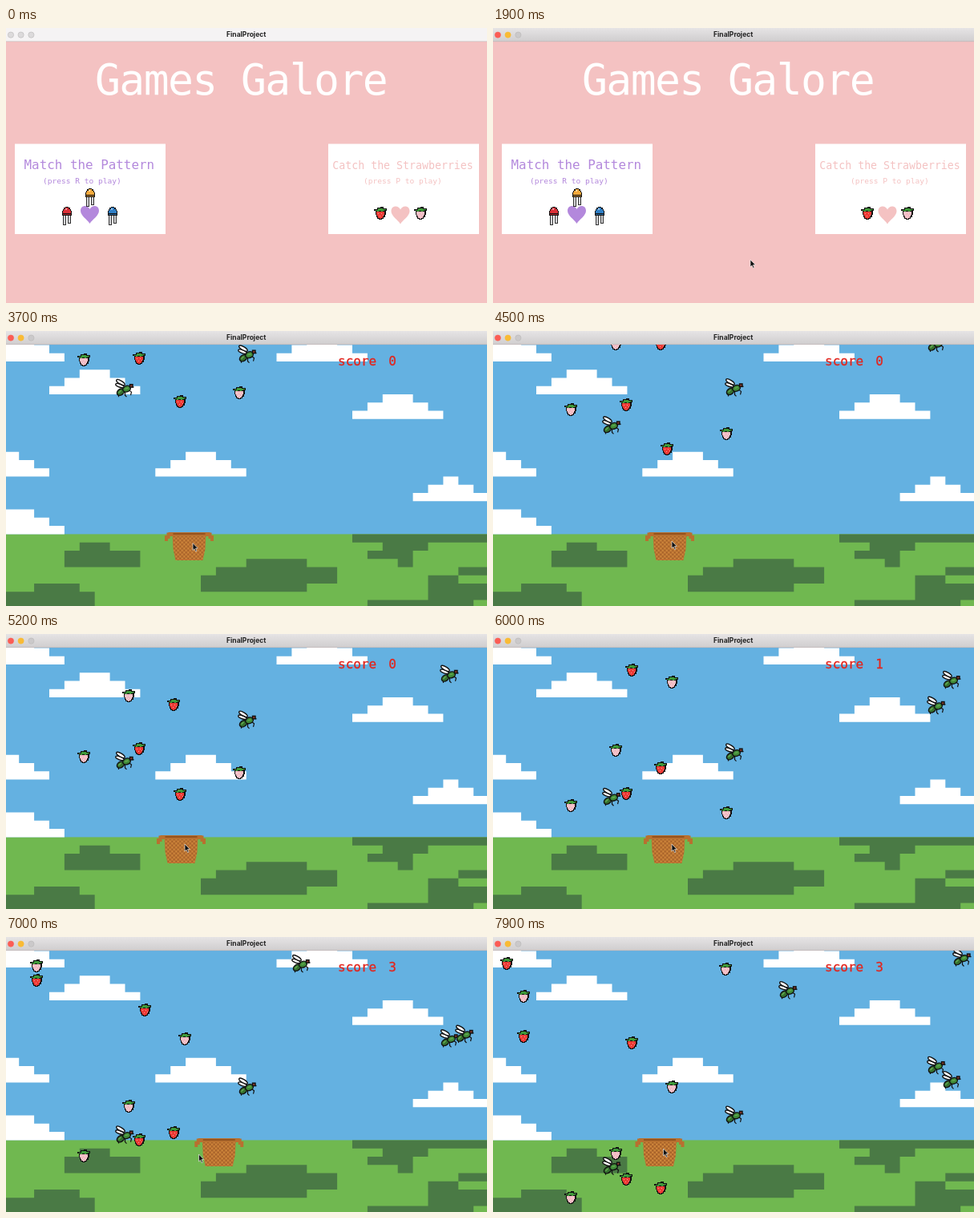
An HTML page for the animation above (8 s loop, 600x343 px).

```html
<!DOCTYPE html>
<html lang="en">
<head>
<meta charset="utf-8">
<title>Games</title>
<style>
  html, body { margin: 0; width: 100%; height: 100%; overflow: hidden; }
  svg { display: block; width: 100vw; height: 100vh; }
  .mono { font-family: "DejaVu Sans Mono", monospace; white-space: pre; }
  .title { font-size: 53px; letter-spacing: -1.57px; }
  .score { font-size: 16px; fill: #e3251d; stroke: #e3251d; stroke-width: .3; }
  .bar { font: 700 8.5px Inter, sans-serif; text-anchor: middle; }
  .pixel { shape-rendering: crispEdges; }
</style>
</head>
<body>
<svg viewBox="0 0 600 343" preserveAspectRatio="none">
  <defs>
    <linearGradient id="barFill" x2="0" y2="1">
      <stop stop-color="#e6e4e5"/><stop offset="1" stop-color="#cfcdce"/>
    </linearGradient>
    <pattern id="weave" width="5" height="5" patternUnits="userSpaceOnUse">
      <rect width="5" height="5" fill="#cc843a"/>
      <path d="M0 0H2.5V5H5V2.5H0Z" fill="#a9632a"/>
    </pattern>
    <path id="cloud" d="M0 0h6v-1h-1v-1h-1v-1h-2v1h-1v1h-1z"/>
    <path id="heart" d="M0 11C-3 6-11.5 1-11.5-5C-11.5-9-9-11-6-11C-3-11-1-9 0-7C1-9 3-11 6-11C9-11 11.5-9 11.5-5C11.5 1 3 6 0 11Z"/>
    <g id="berry" class="pixel">
      <path d="M-8-5H-4V-7H0V-8H4V-6H8V-3H7V2H6V5H4V7H2V8H-2V7H-4V5H-5V2H-6V-3H-8Z" fill="#111"/>
      <path d="M-5-2H5V2H4V4H3V6H1V7H-1V6H-3V4H-4V2H-5Z"/>
      <path d="M-6-4H-3V-6H3V-5H7V-4H5V-3H3V-2H1V-3H-2V-2H-4V-3H-6Z" fill="#3f9a3a"/>
      <path d="M-3 0h1v1h-1zM1 0h1v1h-1zM-1 3h1v1h-1zM3 2h1v1h-1z" fill="#fff" opacity=".5"/>
    </g>
    <g id="red" fill="#ee3a35"><use href="#berry"/></g>
    <g id="pink" fill="#f3bcc4"><use href="#berry"/></g>
    <g id="fly" stroke="#111" stroke-width="1.4">
      <path d="M-3 5L-7 8V11M1 5V9L3 11M5 2L9 5L8 9M8-2L12-1" fill="none" stroke-width="1.2"/>
      <ellipse cx="-4.5" cy="5" rx="5" ry="3.6" transform="rotate(-35 -4.5 5)" fill="#35702f"/>
      <ellipse cx="3" cy="1" rx="5" ry="3.8" transform="rotate(-20 3 1)" fill="#3f8a38"/>
      <path d="M-7 6L-4 3M1 1L5 0" stroke="#68ad53"/>
      <ellipse cx="-5.5" cy="-3" rx="5.5" ry="2" transform="rotate(20 -5.5 -3)" fill="#fff"/>
      <ellipse cx="-4.5" cy="-7" rx="6" ry="2.1" transform="rotate(30 -4.5 -7)" fill="#fff"/>
      <rect x="7" y="-4.5" width="3.5" height="3.5" fill="#8c3a2c"/>
    </g>
    <g id="led" class="pixel">
      <path d="M-5 10H-1V23H-5ZM1 10H5V21H1Z" fill="#333"/>
      <path d="M-4 10H-2V22H-4ZM2 10H4V20H2Z" fill="#d5d5d8"/>
      <path d="M-6 11V5H-5V3H-4V1H-2V0H2V1H4V3H5V5H6V11Z" fill="#111"/>
      <path d="M-5 8V5H-4V3H-2V1H2V3H4V5H5V8Z"/>
      <path d="M-5 9H5V10H-5Z" opacity=".75"/>
      <path d="M-2 2H0V4H-2Z" fill="#fff" opacity=".5"/>
    </g>
  </defs>

  <g id="menu">
    <rect width="600" height="343" fill="#f4c2c2"/>
    <text class="mono title" x="111" y="82.5" fill="#fff">Games Galore</text>
    <path d="M11 144.5H199V257H11ZM402 144.5H590V257H402Z" fill="#fff"/>
    <g class="mono" fill="#b388dc">
      <text x="22.5" y="175.5" font-size="15.9">Match the Pattern</text>
      <text x="46" y="194" font-size="9.55">(press R to play)</text>
      <use href="#heart" x="104.5" y="233"/>
    </g>
    <g class="mono" fill="#f4c2c2">
      <text x="407.3" y="175.5" font-size="13.25">Catch the Strawberries</text>
      <text x="446" y="194" font-size="9.55">(press P to play)</text>
      <use href="#heart" x="492" y="233.5"/>
    </g>
    <use href="#led" x="104.5" y="200" fill="#f6a93b"/>
    <use href="#led" x="76" y="223" fill="#dc3038"/>
    <use href="#led" x="133" y="223" fill="#2f7fc6"/>
    <use href="#red" x="467" y="231"/>
    <use href="#pink" x="517" y="231"/>
  </g>

  <g id="game">
    <rect width="600" height="343" fill="#64b1e1"/>
    <!-- Landscape in units of one coarse block -->
    <g transform="translate(-2.7 17.4) scale(18.9 10.26)">
      <rect y="23" width="32" height="9" fill="#70b850"/>
      <g fill="#fff">
        <use href="#cloud" x="-2" y="2"/><use href="#cloud" x="18" y="2"/>
        <use href="#cloud" x="3" y="6"/><use href="#cloud" x="23" y="9"/>
        <use href="#cloud" x="-3" y="16"/><use href="#cloud" x="10" y="16"/>
        <use href="#cloud" x="-2" y="23"/>
        <path d="M27 19h5v-1h-1v-1h-1v-1h-1v1h-1v1h-1z"/>
      </g>
      <g fill="#4a7a45">
        <path d="M5 24h2v1h2v2h-5v-2h1z"/>
        <path d="M16 26h4v1h2v2h-2v1h-7v-2h1v-1h2z"/>
        <path d="M2 29h3v1h1v2h-6v-2h2z"/>
        <path d="M23 23h9v1h-4v1h-1v2h-1v-1h-2v-1h1v-1h-2z"/>
        <path d="M30 27h2v1h-2v1h2v2h-1v1h-7v-1h4v-3h2z"/>
      </g>
    </g>
    <text class="mono score" x="414" y="43">score</text>
    <text class="mono score" id="score" x="477.3" y="43"></text>
    <g id="basket">
      <path d="M-20 253.5H-26V257H-28.5V262M20 253.5H26V257H28.5V262" fill="none" stroke="#b8702f" stroke-width="4"/>
      <path d="M-21 253H21L20 272L17 286H-17L-20 272Z" fill="url(#weave)"/>
      <path d="M-26 251H26V256H-26Z" fill="#b8702f"/>
      <path d="M-20 252H20V254H-20Z" fill="#94531f"/>
    </g>
    <g id="items"></g>
  </g>

  <rect id="bar" width="600" height="17"/>
  <path d="M0 16.7H600" stroke="#b9a9a9" stroke-opacity=".5"/>
  <g id="lights" stroke-width=".6">
    <circle cx="6" cy="8.6" r="3.6"/><circle cx="18.6" cy="8.6" r="3.6"/><circle cx="31.4" cy="8.6" r="3.6"/>
  </g>
  <text class="bar" x="299.7" y="11.4" fill="#222">FinalProject</text>
  <path id="cursor" d="M0 0V9L2 7.2L3.6 10.6L5 10L3.5 6.6H6.4Z" fill="#111" stroke="#fff" stroke-width=".6"/>
</svg>
<script>
const LOOP = 8000, STEP = 100;
const ENTER = 500, FOCUS = 1500, START = 2480;
const WAVE_GAP = 1000, SPAWN_Y = 14, RIM_Y = 248, REACH = 30, LAG = 100;
const POINTS = { pink: 2, red: 1 };
const $ = id => document.getElementById(id);

// Piecewise linear: each key is [time, ...values]
function track(keys, t, value = 1) {
  const i = keys.findIndex(key => key[0] > t);
  if (i < 1) return keys.at(i)[value];
  const a = keys[i - 1], b = keys[i];
  return a[value] + (b[value] - a[value]) * (t - a[0]) / (b[0] - a[0]);
}

// Distance fallen at speed 1: slow while loading, and again as the sky fills up
const fallKeys = [[START, -41], [3480, 14], [3700, 36], [5200, 153], [6000, 214], [LOOP, 331]];
const fallen = t => track(fallKeys, t);

const pointer = [[ENTER, 340, 200], [900, 321, 289], [3000, 321, 289], [3600, 233, 264.5],
  [4000, 233, 264.5], [4500, 223, 262], [6000, 223, 262], [6400, 295, 268], [6800, 300, 268],
  [7000, 240.5, 271], [7150, 212.5, 264], [LOOP, 212.5, 264]];
const basketX = t => track(pointer, t - LAG) - 4.5;

// Every wave drops three things, each at its own x and speed
const waves = [
  { red: [217, .957], pink: [291, .82], fly: [148, .742] },
  { red: [166, .925], pink: [97, 1], fly: [301, .668] },
  { red: [209, 1.31], pink: [153, 1.12], fly: [553, .64] },
  { red: [173, .78], pink: [223, 1.15], fly: [572, 1.09] },
  { red: [38, 1.33], pink: [38, .72], fly: [368, .63] },
  { red: [17, .77], pink: [290, 1.06], fly: [585, .47] }
];

function makeItem(kind, x, speed, born) {
  const el = document.createElementNS('http://www.w3.org/2000/svg', 'use');
  el.setAttribute('href', '#' + kind);
  $('items').append(el);
  const y = t => SPAWN_Y + speed * (fallen(t) - fallen(born));
  let landed = born;
  while (landed < LOOP && y(landed) < RIM_Y) landed += STEP / 4;
  const points = POINTS[kind] || 0;
  const caught = points && Math.abs(basketX(landed) - x) < REACH ? landed : Infinity;
  return { el, x, y, born, caught, points };
}
const items = waves.flatMap((wave, i) => Object.entries(wave).map(
  ([kind, [x, speed]]) => makeItem(kind, x, speed, START + i * WAVE_GAP)));

const show = (el, on) => el.setAttribute('display', on ? 'inline' : 'none');
const place = (el, x, y) => el.setAttribute('transform', `translate(${x} ${y})`);

function draw(t) {
  const active = t >= FOCUS, playing = t >= START;
  $('bar').setAttribute('fill', active ? 'url(#barFill)' : '#f5f3f4');
  const colors = active ? ['#fb5d55', '#f9bb35', '#cbc9ca'] : Array(3).fill('#dcdadb');
  [...$('lights').children].forEach((light, i) => {
    light.setAttribute('fill', colors[i]);
    light.setAttribute('stroke', active && i < 2 ? colors[i] : '#b9b7b8');
  });
  show($('menu'), !playing);
  show($('game'), playing);
  show($('cursor'), t >= ENTER);
  place($('cursor'), track(pointer, t), track(pointer, t, 2));
  place($('basket'), basketX(t), 0);
  let score = 0;
  for (const item of items) {
    show(item.el, t >= item.born && t < item.caught);
    place(item.el, item.x - .5, item.y(t));
    if (t >= item.caught) score += item.points;
  }
  $('score').textContent = score;
}

function frame() {
  draw(Math.floor(performance.now() % LOOP / STEP) * STEP);
  requestAnimationFrame(frame);
}
frame();
</script>
</body>
</html>
```
